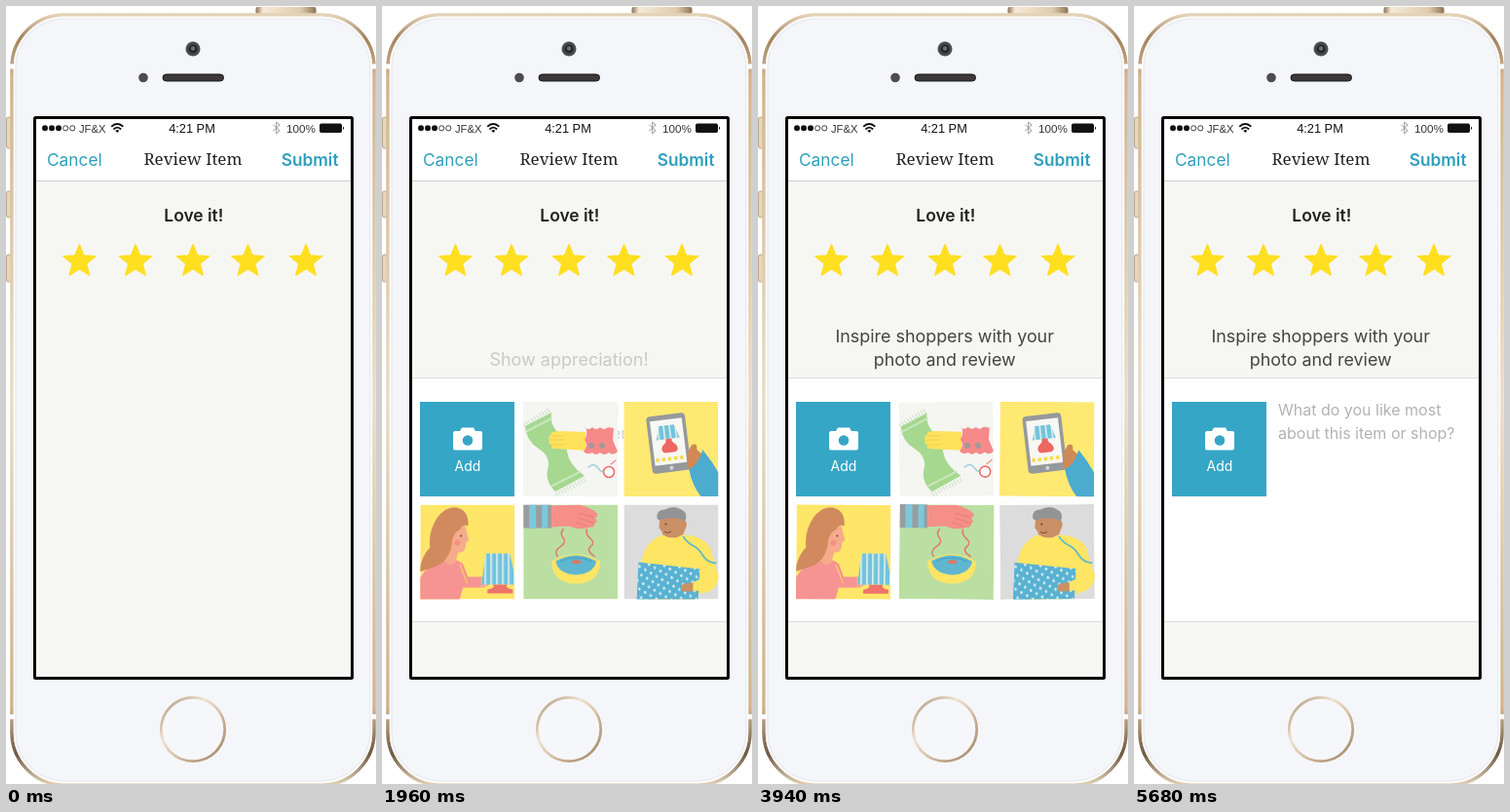
An HTML page for the animation above (6.71 s loop, 380 px wide and 798 px high).

```html
<!DOCTYPE html>
<html lang="en">
<head>
<meta charset="utf-8">
<title>Review Item</title>
<style>
  html, body { margin: 0; width: 100%; height: 100%; overflow: hidden; background: #fff; }
  svg { display: block; width: 380px; height: 798px; font-family: Inter, sans-serif; }
  .status { font-family: "Liberation Sans", Arial, sans-serif; }
  .serif { font-family: "Noto Serif", serif; }
  .mid { text-anchor: middle; }
  .line { fill: none; stroke-linecap: round; stroke-linejoin: round; }
</style>
</head>
<body>
<svg viewBox="0 0 380 798">
  <defs>
    <linearGradient id="gold" x1="0" y1="0" x2="0" y2="1">
      <stop offset="0" stop-color="#e4d3b8"/>
      <stop offset=".03" stop-color="#a3835f"/>
      <stop offset=".08" stop-color="#d2b48e"/>
      <stop offset=".5" stop-color="#ecdcc4"/>
      <stop offset=".9" stop-color="#cfb38d"/>
      <stop offset=".96" stop-color="#6f5a44"/>
      <stop offset="1" stop-color="#e4d3b8"/>
    </linearGradient>
    <linearGradient id="button">
      <stop offset="0" stop-color="#8d7354"/>
      <stop offset=".12" stop-color="#f3e8d6"/>
      <stop offset=".75" stop-color="#dfcbad"/>
      <stop offset="1" stop-color="#8d7354"/>
    </linearGradient>
    <linearGradient id="ring" x2="1" y2="1">
      <stop offset="0" stop-color="#a78b6c"/>
      <stop offset=".35" stop-color="#efe3d3"/>
      <stop offset=".65" stop-color="#cbb294"/>
      <stop offset="1" stop-color="#9f8466"/>
    </linearGradient>
    <clipPath id="screen"><rect x="31" y="116" width="323" height="572"/></clipPath>
    <clipPath id="square"><rect width="97" height="97"/></clipPath>
    <pattern id="stripes" width="6" height="8" patternUnits="userSpaceOnUse">
      <rect width="6" height="8" fill="#72c3db"/><rect width="1.5" height="8" fill="#e9f4f2"/>
    </pattern>
    <pattern id="dots" width="10" height="9" patternUnits="userSpaceOnUse" patternTransform="rotate(-12)">
      <rect width="10" height="9" fill="#58b2d2"/>
      <g fill="#f2f7f5"><ellipse cx="2.5" cy="2.3" rx="1.1" ry="1.6"/><ellipse cx="7.5" cy="6.8" rx="1.1" ry="1.6"/></g>
    </pattern>
  </defs>

  <!-- Phone -->
  <rect x="256.500" y="1" width="62" height="8" rx="2" fill="url(#button)"/>
  <g fill="#e6d7bf" stroke="#a58b6c" stroke-width=".7">
    <rect x=".5" y="114" width="5" height="32" rx="2"/>
    <rect x=".5" y="190" width="5" height="27" rx="2"/>
    <rect x=".5" y="255" width="5" height="28" rx="2"/>
  </g>
  <rect x="6" y="9" width="372" height="790" rx="54" fill="#f5f6f9" stroke="url(#gold)" stroke-width="3.6"/>
  <rect x="8.7" y="11.7" width="366.6" height="784.6" rx="51" fill="none" stroke="#fff" stroke-width="1.8"/>
  <rect x="10" y="13" width="364" height="782" rx="50" fill="none" stroke="#dfe0e4" stroke-width=".7"/>
  <path d="M4 62h4M376 62h4M4 729h4M376 729h4" stroke="#fff" stroke-width="5"/>
  <circle cx="192" cy="44" r="7.5" fill="#4b4d51"/>
  <circle cx="192" cy="44" r="4.6" fill="#25272b"/>
  <circle cx="192" cy="43.5" r="2.2" fill="#6b7079"/>
  <circle cx="141" cy="73.5" r="4.8" fill="#4d4d51"/>
  <rect x="161" y="70" width="62.5" height="7" rx="3.5" fill="#3c3938" stroke="#17181a"/>
  <circle cx="192" cy="742" r="32.7" fill="#f6f7fa" stroke="url(#ring)" stroke-width="2.8"/>
  <rect x="28" y="113" width="329" height="578" rx="2.5" fill="#000"/>

  <!-- Screen -->
  <g clip-path="url(#screen)">
    <rect x="31" y="116" width="323" height="572" fill="#f6f7f2"/>
    <rect x="31" y="116" width="323" height="63" fill="#fff"/>
    <path d="M31 179.500H354" stroke="#cfcfd0"/>

    <g fill="#111" class="status">
      <circle cx="40" cy="125.300" r="3"/><circle cx="47" cy="125.300" r="3"/><circle cx="54" cy="125.300" r="3"/>
      <g fill="none" stroke="#111" stroke-width=".8"><circle cx="61.200" cy="125.300" r="2.600"/><circle cx="68.200" cy="125.300" r="2.600"/></g>
      <text x="75" y="129.600" font-size="11.200" fill="#333">JF&amp;X</text>
      <path class="line" stroke="#111" stroke-width="1.800" d="M108.800 123.200q5.500-4.400 11 0M111 126q3.300-2.700 6.600 0"/>
      <path d="M112.300 127.700q2-1.400 4 0l-2 2.200z"/>
      <text x="191" y="129.600" font-size="12.800" class="mid">4:21 PM</text>
      <path class="line" d="M274.500 122l6.500 6-3.300 3v-12l3.300 3-6.500 6" stroke="#999"/>
      <text x="288" y="129.600" font-size="11.700" fill="#333">100%</text>
      <rect x="322.500" y="121" width="22" height="8.600" rx="1.200" stroke="#111"/>
      <path d="M346 123.500q2.200 1.800 0 3.600z"/>
    </g>

    <g fill="#2fa0bd" font-size="17.300">
      <text x="42" y="164">Cancel</text>
      <text x="341.500" y="164" text-anchor="end" font-weight="600">Submit</text>
    </g>
    <text x="192" y="163" class="serif mid" font-size="17" font-weight="500" fill="#222">Review Item</text>
    <text x="192.800" y="221" class="mid" font-size="17.400" font-weight="600" fill="#222">Love it!</text>
    <g id="stars" fill="#ffdf20" stroke="#ffdf20" stroke-width="1.200" stroke-linejoin="round"></g>

    <g id="inspire" class="mid" font-size="17.900" fill="#444">
      <text x="191.700" y="345">Inspire shoppers with your</text>
      <text x="191.700" y="369">photo and review</text>
    </g>

    <g id="panel">
      <text id="appreciate" x="192" y="369" class="mid" font-size="18" fill="#444">Show appreciation!</text>
      <rect x="30" y="381.500" width="325" height="250" fill="#fff" stroke="#dcdcda"/>
      <g id="prompt" font-size="16" fill="#b2b2b2">
        <text x="148" y="420">What do you like most</text>
        <text x="148" y="444">about this item or shop?</text>
      </g>
      <rect x="39" y="406" width="97" height="97" fill="#36a6c6"/>
      <path d="M75 436h5l2-3.500h12l2 3.500h5q2 0 2 2v15.500q0 2-2 2h-26q-2 0-2-2v-15.500q0-2 2-2z" fill="#fff"/>
      <circle cx="88" cy="445.500" r="5.300" fill="#36a6c6"/>
      <text x="88" y="477" class="mid" font-size="14" fill="#fff">Add</text>

      <!-- Towel -->
      <g class="card">
        <rect width="97" height="97" fill="#f5f5f2"/>
        <path class="line" d="M1 24L28 8M34 95L65 79" stroke="#c3dfb8" stroke-width="5" stroke-dasharray=".8 2.400" style="stroke-linecap:butt"/>
        <path d="M2 25L29 11Q27 25 38 33Q46 40 45 51Q47 65 63 76L33 92Q21 80 26 66Q27 55 16 48Q3 40 2 25z" fill="#a6d890"/>
        <path class="line" d="M4 30L29 17M30 86L58 72" stroke="#c9e7ba" stroke-width="2"/>
        <path d="M64 31L38 30Q29 30 28 34Q25 36 27 39Q25 42 29 44Q28 49 35 48L64 50z" fill="#ffe25c"/>
        <path class="line" d="M29 35H42M28 39H42M30 44H43" stroke="#e8c85a" stroke-width=".7"/>
        <path d="M63 26q4 4 8 0q4 4 8 0q4 4 8 0l6 1-1 12 5 12q-5 5-9 1-5 4-9 0-5 4-8 0-5 3-9-1 5-6 1-12 4-7 1-13z" fill="#f58a89"/>
        <g fill="#a09a99"><circle cx="70" cy="45" r="3"/><circle cx="81" cy="45" r="3"/></g>
        <path class="line" d="M67 67q6-5 10 1t8 2" stroke="#9bd0dc" stroke-width="1.500"/>
        <path class="line" d="M90 64l5-4" stroke="#ef8a84" stroke-width="1.200"/>
        <circle cx="88" cy="72" r="5.500" fill="#fff" stroke="#ec6f69" stroke-width="1.600"/>
      </g>

      <!-- Tablet -->
      <g class="card">
        <rect width="97" height="97" fill="#fee973"/>
        <g transform="rotate(-7 46 42)">
          <rect x="26" y="13" width="40" height="59" rx="4" fill="#96999b"/>
          <rect x="29.500" y="18" width="33" height="46" fill="#f7f7f3"/>
          <circle cx="46" cy="68" r="2" fill="#d5d8d8"/>
          <path d="M38 24h16l4 14h-24z" fill="url(#stripes)"/>
          <path d="M43 38h7q-2 3 3 6 4 5-1 8h-11q-5-3-1-8 5-3 3-6z" fill="#ee6660"/>
          <path d="M31 58.500h29" stroke="#f9d94a" stroke-width="3.500" stroke-dasharray="3.500 2.700"/>
        </g>
        <path d="M65 62Q64 52 70 44Q76 42 75 49L84 57L74 74Q65 71 65 62z" fill="#cf8957"/>
        <path d="M67 69Q77 65 81 49Q91 61 98 74V98H80Q70 86 67 69z" fill="#4dabd0"/>
      </g>

      <!-- Woman with lamp -->
      <g class="card">
        <rect width="97" height="97" fill="#fee669"/>
        <path d="M23 56Q36 54 44 61L49 74H66V85H44L40 98H-1V76Q9 60 23 56z" fill="#f59492"/>
        <path d="M28 22Q38 15 46 22L50 36L47 39Q47 50 39 49L36 60Q30 64 24 57z" fill="#f5ab8c"/>
        <path d="M-1 69Q1 53 10 44Q8 28 17 14Q26 1 38 3Q51 7 49 22Q44 19 41 25Q32 30 32 44Q27 60 14 64Z" fill="#d18a5e"/>
        <circle cx="42" cy="32" r="1" fill="#70463a"/>
        <circle cx="38" cy="39" r="3" fill="#f59083"/>
        <path class="line" d="M41 62L48 80" stroke="#f7c965" stroke-width="1.400"/>
        <path d="M62 75q9-3 10 3t-10 7z" fill="#f5ab8c"/>
        <path d="M67 50h25l7 32h-36z" fill="url(#stripes)"/>
        <path d="M75 82h14q-2 4 6 5v4h-26v-4q8-1 6-5z" fill="#ee736a"/>
      </g>

      <!-- Handbag -->
      <g class="card">
        <rect width="97" height="97" fill="#bbdfa2"/>
        <path d="M0 0h29v24H0z" fill="#9a9d9f"/>
        <path d="M6 0h7v24H6zM19 0h6v24h-6z" fill="#7cc9dc"/>
        <path d="M29 1L57 0Q70 3 76 9Q77 13 73 13Q78 18 73 19Q74 24 67 23Q58 27 47 22L29 23z" fill="#f58f88"/>
        <path class="line" d="M58 9L73 13M57 14L73 19M54 18L67 23" stroke="#e07b74" stroke-width=".8"/>
        <path class="line" d="M41 25q-4 5 0 9t-3 9-3 10M65 25q-1 6 4 10t0 8 4 10" stroke="#e5776b" stroke-width="1.500"/>
        <path d="M29 58Q54 44 79 58Q78 81 54 81Q30 81 29 58z" fill="#ffe564"/>
        <path d="M33 58Q54 46 75 58Q72 71 54 72Q36 71 33 58z" fill="#5fb6d0"/>
        <path class="line" d="M38 58Q54 51 70 58" stroke="#469fbd"/>
        <rect x="50" y="57" width="9" height="3.500" rx="1.700" fill="#e67465"/>
      </g>

      <!-- Man with parcel -->
      <g class="card">
        <rect width="97" height="97" fill="#dcdcdc"/>
        <path d="M37 13Q49 11 60 15Q67 17 63 25L58 37H41Q40 27 36 24z" fill="#ca9066"/>
        <path d="M34 14Q33 5 42 5Q51 0 59 5Q66 8 63 17L59 15Q48 12 36 16z" fill="#929495"/>
        <circle cx="43" cy="20" r="1" fill="#5d4336"/>
        <path class="line" d="M42 28q3 2 6 0" stroke="#7a4b37"/>
        <path d="M40 31Q50 37 60 31Q79 31 88 43L97 73Q96 90 78 91L72 98H25L29 63L17 64Q20 37 40 31z" fill="#ffe564"/>
        <path class="line" d="M61 33q4 6 10 9t10 10 13 8" stroke="#62bbc4" stroke-width="1.800"/>
        <path d="M15 59L78 66L76 98H13z" fill="url(#dots)"/>
        <path d="M98 70Q98 84 84 87L70 89L70 80L81 75z" fill="#ffe564"/>
        <path d="M71 80l-10 1q-5 5 0 8l10 0z" fill="#ca9066"/>
      </g>
    </g>
  </g>
</svg>
<script>
const LOOP = 6710;
const $ = id => document.getElementById(id);
const clamp = v => Math.min(1, Math.max(0, v));
const ramp = (t, from, to) => clamp((t - from) / (to - from));

// sway: small wobble in degrees; lean: tilt just before the drop;
// spin and drift: turn and sideways travel per 180 px of fall
const cards = [
  { x: 145, y: 406, drop: 4840, sway: .6, lean: 2.7, spin: 8, drift: -14 },
  { x: 248.3, y: 406, drop: 4810, sway: -.4, lean: 0, spin: 10, drift: 16 },
  { x: 39.3, y: 511.5, drop: 4610, sway: -.4, lean: -1, spin: -10, drift: -14 },
  { x: 145.2, y: 511.5, drop: 4687, sway: -.5, lean: 1.5, spin: 4, drift: -15 },
  { x: 248.5, y: 511.5, drop: 4654, sway: .5, lean: 1, spin: 13, drift: 10 }
];
document.querySelectorAll('.card').forEach((node, i) => {
  node.setAttribute('clip-path', 'url(#square)');
  cards[i].node = node;
});

function starPoints(cx, cy, radius) {
  return Array.from({ length: 10 }, (_, i) => {
    const r = i % 2 ? radius * .44 : radius;
    const a = i * Math.PI / 5 - Math.PI / 2;
    return `${cx + r * Math.cos(a)},${cy + r * Math.sin(a)}`;
  }).join(' ');
}
$('stars').innerHTML = [75.4, 133, 192, 248.5, 308]
  .map(x => `<polygon points="${starPoints(x, 262, 17.6)}"/>`).join('');

function poseCard(card, t, shown) {
  const fall = 60 * Math.pow(Math.max(0, t - card.drop) / 120, 2.5);
  const turn = Math.min(fall, 360) / 180;
  const wobble = card.sway * ramp(t, 2920, 3400) * Math.cos((t - 2920) / 660 * 2 * Math.PI);
  const angle = wobble + card.lean * ramp(t, 4500, 4840) + card.spin * turn;
  card.node.setAttribute('transform',
    `translate(${card.x + card.drift * turn} ${card.y + fall}) rotate(${angle} 48.5 48.5)`);
  card.node.setAttribute('opacity', shown * clamp(1 - fall / 450));
}

function draw(t) {
  const slide = t < 1000 ? 0 : 1 - Math.pow(1 - ramp(t, 970, 1660), 3.4);
  $('panel').setAttribute('transform', `translate(0 ${308 * (1 - slide)})`);
  $('appreciate').setAttribute('opacity', slide * (1 - ramp(t, 1690, 2050)));
  $('inspire').setAttribute('opacity', ramp(t, 2170, 2740));
  $('prompt').setAttribute('opacity',
    t < 5000 ? .6 * (1 - ramp(t, 2200, 2860)) : ramp(t, 5290, 5680));
  cards.forEach(card => poseCard(card, t, slide * slide));
}

function tick() {
  draw(performance.now() % LOOP);
  requestAnimationFrame(tick);
}
tick();
</script>
</body>
</html>
```
